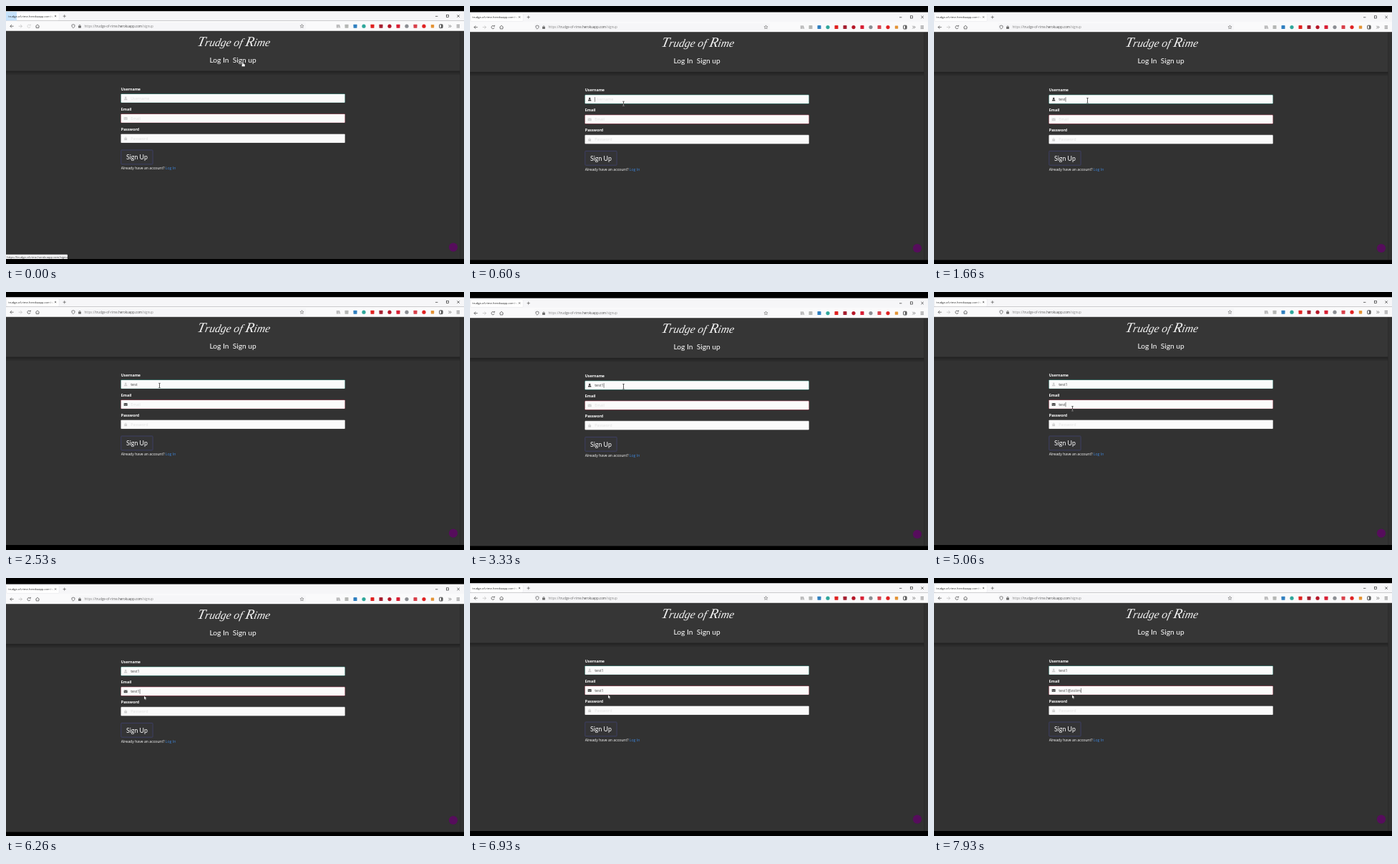
These frames come from a looping animation (640 by 360 pixels, 8000 ms). An HTML page with a canvas:

```html
<!DOCTYPE html>
<html lang="en">
<head>
<meta charset="utf-8">
<title>Sign up</title>
<style>
  html, body { margin: 0; width: 100%; height: 100%; overflow: hidden; background: #000; }
  canvas { display: block; width: 640px; height: 360px; }
</style>
</head>
<body>
<canvas id="stage" width="640" height="360"></canvas>
<script>
const ctx = document.getElementById('stage').getContext('2d');
const LOOP = 8000, STEP = 1000 / 15, BLINK = 530;
const UI = '"Open Sans", "Noto Sans", sans-serif';
const HOST = 'trudge-of-rime.', DOMAIN = 'herokuapp.com', PATH = '/signup';
const VALUES = ['test1', 'test1@zolim'];
const FIELDS = ['Username', 'Email', 'Password'];
const BORDERS = ['#3f9a8b', '#c0566c', '#b5b5b5'];

// [time, focused field, characters typed in it]
const INPUT = [
  [600, 0, 0], [1460, 0, 2], [1600, 0, 3], [1660, 0, 4],
  [2000, 1, 0], [3060, 0, 4], [3260, 0, 5],
  [4060, 1, 0], [4400, 1, 1], [4530, 1, 2], [4660, 1, 3], [5000, 1, 4], [5330, 1, 5],
  [6260, 1, 5], [6400, 1, 5],
  [7000, 1, 6], [7260, 1, 7], [7400, 1, 8], [7530, 1, 9], [7800, 1, 10], [7930, 1, 11]
];
// [time, x, y] of the pointer
const MOUSE = [
  [60, 331, 80], [330, 262, 112], [600, 214.5, 135], [800, 214.5, 130.5],
  [3330, 214.5, 130.5], [3660, 193.5, 162.8], [5730, 193.5, 162.8], [5860, 193, 163]
];
const LOW = [[130, 2060], [3200, 4060], [4460, 5000], [5800, 6330]];

function rect(x, y, w, h, color) {
  ctx.fillStyle = color;
  ctx.fillRect(x, y, w, h);
}

function round(x, y, w, h, r, fill, line, width = .7) {
  ctx.beginPath();
  ctx.roundRect(x, y, w, h, r);
  if (fill) { ctx.fillStyle = fill; ctx.fill(); }
  if (line) { ctx.strokeStyle = line; ctx.lineWidth = width; ctx.stroke(); }
}

function disc(x, y, r, color) {
  ctx.beginPath();
  ctx.arc(x, y, r, 0, 7);
  ctx.fillStyle = color;
  ctx.fill();
}

function line(color, width, ...pts) {
  ctx.beginPath();
  for (let i = 0; i < pts.length; i += 2) ctx.lineTo(pts[i], pts[i + 1]);
  ctx.strokeStyle = color;
  ctx.lineWidth = width;
  ctx.stroke();
}

function shape(color, ...pts) {
  ctx.beginPath();
  for (let i = 0; i < pts.length; i += 2) ctx.lineTo(pts[i], pts[i + 1]);
  ctx.closePath();
  ctx.fillStyle = color;
  ctx.fill();
}

function text(str, x, y, font, color, align = 'left') {
  ctx.font = font;
  ctx.fillStyle = color;
  ctx.textAlign = align;
  ctx.fillText(str, x, y);
  return x + ctx.measureText(str).width;
}

function padlock(x, y, color) {
  ctx.beginPath();
  ctx.arc(x, y - .6, 1.2, Math.PI, 0);
  ctx.strokeStyle = color;
  ctx.lineWidth = .7;
  ctx.stroke();
  rect(x - 1.9, y - .5, 3.8, 2.8, color);
}

function tabBar(loading) {
  rect(0, 7.2, 640, 13.5, '#f6f6f8');
  round(.8, 9.2, 73.4, 10.8, 1.2, '#fff', '#dedee2', .4);
  if (loading) rect(0, 8, 15, 12.5, '#c5e2fb');
  const fade = ctx.createLinearGradient(58, 0, 67, 0);
  fade.addColorStop(0, '#222');
  fade.addColorStop(1, 'rgba(34,34,34,0)');
  ctx.save();
  ctx.beginPath();
  ctx.rect(0, 8, 67, 13);
  ctx.clip();
  text(HOST + DOMAIN + PATH, 3.2, 15.5, '4.05px ' + UI, fade);
  ctx.restore();
  line('#333', .6, 68, 13, 70.2, 15.2);
  line('#333', .6, 70.2, 13, 68, 15.2);
  line('#444', .6, 79.6, 14.2, 83.8, 14.2);
  line('#444', .6, 81.7, 12.1, 81.7, 16.3);
  line('#333', .7, 600, 14.4, 603.4, 14.4);
  ctx.strokeRect(615.4, 12.4, 3.2, 3.2);
  line('#333', .7, 630.4, 12.4, 633.8, 15.8);
  line('#333', .7, 633.8, 12.4, 630.4, 15.8);
}

function navBar(loading) {
  rect(0, 20.6, 640, 14.2, '#fafafb');
  const y = 28.2;
  line('#444', .7, 10.6, y, 5.8, y);
  line('#444', .7, 8, y - 2.2, 5.8, y, 8, y + 2.2);
  line('#bbb', .7, 17.6, y, 22.4, y);
  line('#bbb', .7, 20.2, y - 2.2, 22.4, y, 20.2, y + 2.2);

  const reload = loading ? '#ccc' : '#444';
  ctx.beginPath();
  ctx.arc(32, y, 2.1, .3, 5.4);
  ctx.strokeStyle = reload;
  ctx.lineWidth = .7;
  ctx.stroke();
  shape(reload, 32.4, y - 1, 34.6, y - 1, 34.6, y - 3);
  line('#444', .7, 41.4, y, 44, y - 2.4, 46.6, y);
  line('#444', .7, 42.1, y - .4, 42.1, y + 2.3, 45.9, y + 2.3, 45.9, y - .4);

  round(90, 22.8, 329, 10.8, 1.4, '#f6f6f8');
  line('#555', .7, 94, y - 2.6, 96.1, y - 1.7, 95.8, y + .8, 94, y + 2.6, 92.2, y + .8, 91.9, y - 1.7, 94, y - 2.6);
  padlock(103, y, '#666');
  const font = '4.5px ' + UI;
  let x = text('https://', 109.6, 29.8, font, '#888');
  x = text(HOST, x, 29.8, font, '#666');
  x = text(DOMAIN, x, 29.8, font, '#4a4a4a');
  text(PATH, x, 29.8, font, '#888');

  const star = [];
  for (let i = 0; i < 11; i++) {
    const a = i * Math.PI / 5 - Math.PI / 2, r = i % 2 ? 1.2 : 2.7;
    star.push(413.5 + r * Math.cos(a), y + r * Math.sin(a));
  }
  line('#555', .5, ...star);

  [462.3, 463.7, 465].forEach(v => line('#777', .6, v, y - 2.3, v, y + 2.3));
  line('#777', .6, 465.5, y - 2, 466.8, y + 2.3);
  const square = (cx, color, s = 2.5) => round(cx - s, y - s, 2 * s, 2 * s, .6, color);
  square(476, '#b5b7b5');
  square(488, '#2f7fc0');
  disc(500, y, 2.6, '#2fa79b');
  square(512, '#e0211f');
  square(524, '#a51f30');
  disc(536, y, 2.6, '#b51627');
  square(548, '#d81f34');
  disc(560, y, 2.6, '#8c8e93');
  square(572, '#d8404a');
  disc(584, y, 2.6, '#e02222');
  square(596, '#e49335', 2.2);
  round(605.7, y - 2.4, 4.4, 4.8, .6, null, '#222', .8);
  rect(608, y - 2.2, 1.9, 4.4, '#555');
  [618.4, 620.4].forEach(v => line('#444', .6, v, y - 1.8, v + 1.7, y, v, y + 1.8));
  [-1.8, 0, 1.8].forEach(d => line('#444', .6, 629.6, y + d, 634, y + d));
}

function header() {
  rect(0, 34.7, 640, 319, '#323232');
  rect(0, 34.7, 640, 56.1, '#363636');
  const shade = ctx.createLinearGradient(0, 90.5, 0, 97);
  shade.addColorStop(0, 'rgba(0,0,0,.35)');
  shade.addColorStop(1, 'rgba(0,0,0,0)');
  rect(0, 90.5, 635, 6.5, shade);
  rect(634.6, 34.7, 5.4, 319, '#303030');
  rect(634.4, 34.7, .6, 319, '#292929');

  // Brush-like heading: slanted italics with taller capitals
  ctx.save();
  ctx.transform(1, 0, -.22, 1, 266.5, 56);
  const serif = 'px "Liberation Serif", "Noto Serif", serif';
  let x = 0;
  for (const part of ['T', 'rudge of ', 'R', 'ime']) {
    x = text(part, x, 0, 'italic ' + (part.length < 2 ? 19.5 : 15.6) + serif, '#f4f4f4');
  }
  ctx.restore();

  const font = '10.2px Lato, sans-serif';
  text('Log In', 298, 79, font, '#fff', 'center');
  text('Sign up', 333.2, 79, font, '#fff', 'center');
}

function fieldIcon(i, y, color) {
  const x = 167.2;
  if (i === 0) {
    disc(x, y - 1.2, 1.3, color);
    round(x - 2.2, y + .3, 4.4, 2, [1.4, 1.4, .3, .3], color);
  } else if (i === 1) {
    round(x - 2.5, y - 1.9, 5, 3.8, .5, color);
    line('#fff', .45, x - 2.5, y - 1.1, x, y + .6, x + 2.5, y - 1.1);
  } else {
    padlock(x, y, color);
  }
}

function form(state) {
  const font = '5.4px ' + UI;
  FIELDS.forEach((name, i) => {
    const y = 122.5 + 28 * i, active = state.focus === i;
    text(name, 160.8, y - 4.7, '700 5.3px ' + UI, '#fff');
    round(160.5, y - .1, 313.2, 12.7, .9, BORDERS[i]);
    round(160.8, y + .4, 312.6, 11.8, .7, '#fbfbfb');
    fieldIcon(i, y + 6.4, active ? '#3f3f3f' : '#cfcfcf');
    const value = i < 2 ? VALUES[i].slice(0, state.typed[i]) : '';
    const end = text(value || name, 174.2, y + 8.3, font, value ? '#444' : '#dfdfdf');
    if (active && state.caret) rect((value ? end : 174) + .1, y + 3.2, .6, 6.6, '#444');
  });

  round(160.8, 201, 44.3, 19.8, .8, '#343436', '#434679', .7);
  text('Sign Up', 182.9, 214.2, '8.8px Lato, sans-serif', '#fff', 'center');
  const x = text('Already have an account? ', 160.8, 228.3, '5.15px ' + UI, '#fff');
  text('Log In', x, 228.3, '5.15px ' + UI, '#3f86dc');
  disc(625, 336.6, 6.1, '#560d5c');
}

function statusBar() {
  round(-1, 346.8, 87, 7, [0, 1, 0, 0], '#f3f3f5');
  text('https://' + HOST + DOMAIN + PATH, 1.2, 351.7, '4.1px ' + UI, '#333');
}

function pointer(kind, x, y) {
  ctx.save();
  ctx.translate(x, y);
  if (kind === 'beam') {
    ctx.globalCompositeOperation = 'difference';
    rect(-.4, -3.2, .8, 6.4, '#ccc');
    rect(-1.4, -3.6, 2.8, .6, '#ccc');
    rect(-1.4, 2.9, 2.8, .6, '#ccc');
  } else if (kind === 'hand') {
    round(-.8, -1.8, 1.5, 5, .7, '#fff', '#222', .4);
    round(-1.6, .8, 4.6, 3.8, 1.2, '#fff', '#222', .4);
    rect(-.4, -.8, .8, 3, '#fff');
  } else {
    shape('#fff', 0, 0, 0, 5, 1.1, 4, 1.9, 5.8, 2.8, 5.4, 2, 3.7, 3.5, 3.6);
    line('#333', .3, 0, 0, 0, 5, 1.1, 4, 1.9, 5.8, 2.8, 5.4, 2, 3.7, 3.5, 3.6, 0, 0);
  }
  ctx.restore();
}

function mouseAt(t) {
  const next = MOUSE.findIndex(k => k[0] > t);
  if (next === 0) return MOUSE[0].slice(1);
  if (next < 0) return MOUSE[MOUSE.length - 1].slice(1);
  const a = MOUSE[next - 1], b = MOUSE[next];
  let p = (t - a[0]) / (b[0] - a[0]);
  p = p * p * (3 - 2 * p);
  return [a[1] + (b[1] - a[1]) * p, a[2] + (b[2] - a[2]) * p];
}

function stateAt(t) {
  const state = { focus: -1, typed: [0, 0], caret: false };
  for (const [time, field, count] of INPUT) {
    if (time > t) break;
    state.focus = field;
    state.typed[field] = count;
    state.caret = Math.floor((t - time) / BLINK) % 2 === 0;
  }
  return state;
}

function draw(ms) {
  const t = Math.floor((ms + 7) / STEP) * STEP + .01;
  const loading = t < 60, low = LOW.some(([a, b]) => t >= a && t < b);
  const [x, y] = mouseAt(t);
  ctx.setTransform(1, 0, 0, 1, 0, 0);
  rect(0, 0, 640, 360, '#000');
  ctx.translate(0, low ? 1.4 : 0);
  header();
  tabBar(loading);
  navBar(loading);
  form(stateAt(t));
  if (t < 130) statusBar();
  rect(0, 353, 640, 8, '#000');
  const kind = t < 130 ? 'hand' : y < 122 || t >= 5800 ? 'arrow' : 'beam';
  pointer(kind, x, y);
}

const start = performance.now();
function tick() {
  draw((performance.now() - start) % LOOP);
  requestAnimationFrame(tick);
}
tick();
</script>
</body>
</html>
```
